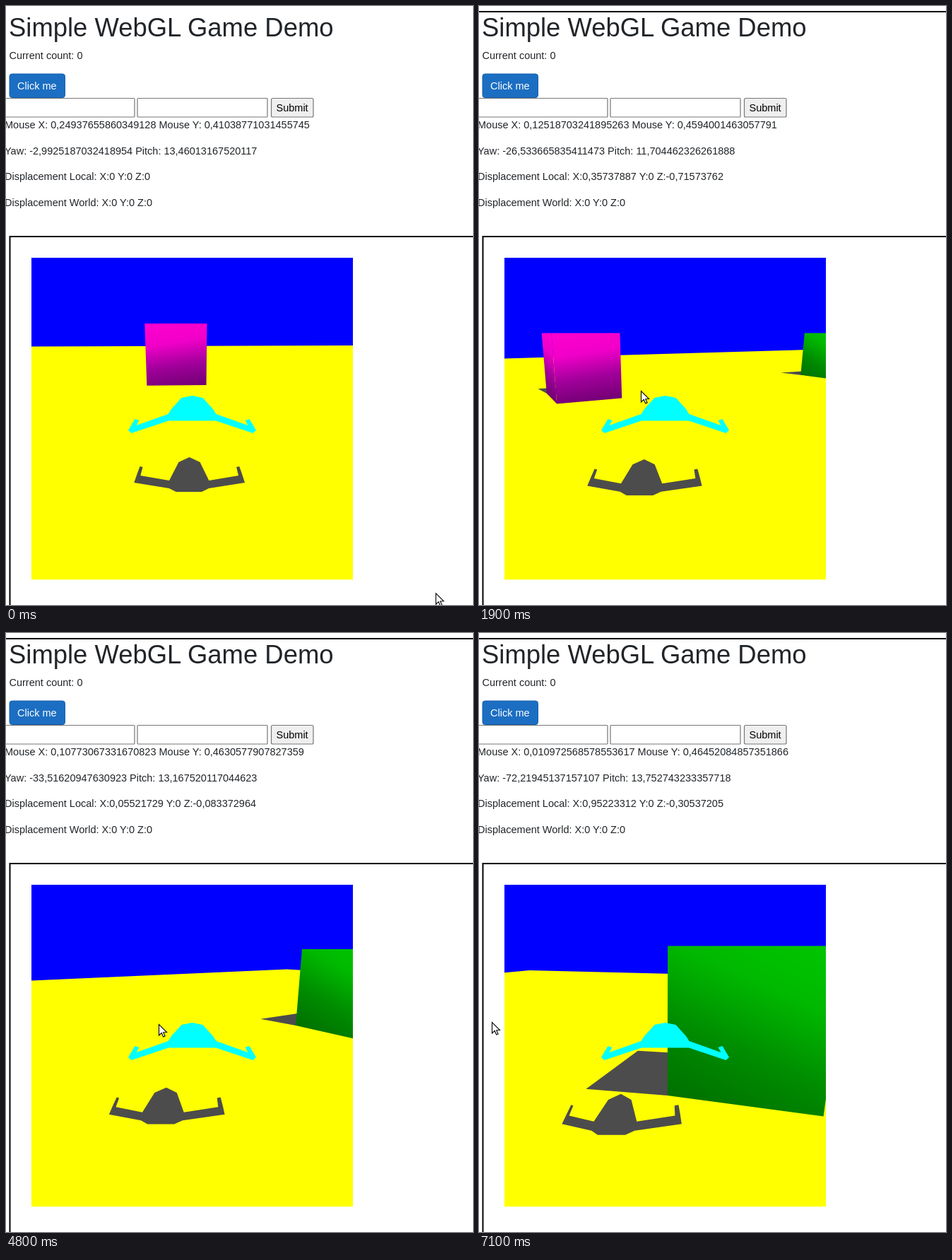
Animation of 661 by 847 pixels, one loop 7200 ms. Source, as an HTML page with a canvas:

```html
<!DOCTYPE html>
<html lang="en">
<head>
<meta charset="utf-8">
<title>Simple WebGL Game Demo</title>
<style>
  html, body { margin: 0; width: 661px; height: 847px; overflow: hidden; background: #fff; }
  svg, canvas { position: absolute; left: 0; top: 0; }
  text { font: 14.5px "Liberation Sans", Arial, sans-serif; fill: #212529; white-space: pre; }
  .title { font-size: 36.43px; }
  .field { fill: #fff; stroke: #767676; stroke-width: 1.2; }
</style>
</head>
<body>
<svg width="661" height="847">
  <path id="topLine" d="M0 8H661" stroke="#000" stroke-width="2"/>
  <path d="M661 326H5.5V847" fill="none" stroke="#000" stroke-width="2"/>
  <text class="title" x="4" y="43">Simple WebGL Game Demo</text>
  <text x="4.5" y="75">Current count: 0</text>
  <rect x="5" y="96" width="78.5" height="33.5" rx="3.5" fill="#1b6ec2" stroke="#1861ac"/>
  <text x="16" y="118" style="fill:#fff">Click me</text>
  <rect class="field" x="-4" y="130.5" width="186" height="26.5" rx="1"/>
  <rect class="field" x="186" y="130.5" width="184" height="26.5" rx="1"/>
  <rect class="field" x="375.5" y="130.5" width="59.5" height="26.5" rx="2" style="fill:#efefef"/>
  <text x="382.5" y="149" style="fill:#000">Submit</text>
  <text id="mouse" x="-2" y="173"></text>
  <text id="angles" x="-2" y="209.5"></text>
  <text id="local" x="-2" y="246"></text>
  <text x="-2" y="282.5">Displacement World: X:0 Y:0 Z:0</text>
</svg>
<canvas width="661" height="847"></canvas>
<script>
const ctx = document.querySelector('canvas').getContext('2d');
const byId = id => document.getElementById(id);
const LOOP = 7200, RAD = Math.PI / 180;
const VIEW = { x: 36, y: 356, size: 455 };
const CENTER = [VIEW.x + VIEW.size / 2, VIEW.y + VIEW.size / 2];
const FOCAL = VIEW.size / 2 / Math.tan(25 * RAD);
const EDGE = 16, NEAR = .05;

// time, camera x, camera z, camera tilt, yaw and pitch in mouse pixels, pointer x, pointer y
const KEYS = [
  [0, -.04, -.25, 15.4, -15, 46, 608, 830],
  [1200, -.06, .69, 14.2, -72, 41, 282, 544],
  [2600, -2.52, .07, 13.64, -194, 38, 176, 544],
  [3900, .18, 1.26, 13.87, -188, 40, 176, 544],
  [4800, 1.79, 3.45, 15.62, -168, 45, 216, 553],
  [5700, 1.8, 2.6, 16.3, -63, 37, 403, 562],
  [7100, 3.39, 5.84, 16.11, -362, 47, 18, 550]
];
const CUBES = [
  { x: 0, z: 6, slant: .15, colors: ['#ff00d0', '#f000c8', '#a0009a', '#700072'] },
  { x: 6, z: 6, slant: .45, colors: ['#00c800', '#00b800', '#008c00', '#007000'] }
];

// Right halves, from the top middle clockwise to the bottom
const SHIP = [[0, -35], [15, -32], [29.5, -16], [34, -9], [79, 7], [75, 0], [81, -2], [90.5, 14], [86, 18], [80, 16], [33.5, .5]];
const SHADE = [[0, -49], [15, -42], [28, -16], [69, -23], [66, -35], [70, -36], [74, -25], [78, -13], [28, -5], [18, 0]];
const mirror = half => [...half, ...half.map(([x, y]) => [-x, y]).reverse()];

const clamp = v => Math.max(0, Math.min(1, v));

function stateAt(t) {
  let i = 0;
  while (i < KEYS.length - 2 && t >= KEYS[i + 1][0]) i++;
  const a = KEYS[i], b = KEYS[i + 1], k = clamp((t - a[0]) / (b[0] - a[0]));
  const [, x, z, tilt, yaw, pitch, px, py] = a.map((v, j) => v + (b[j] - v) * k);
  const ramp = start => clamp((t - start) / 1000);
  return {
    x, z, yaw, pitch, px, py,
    tilt: tilt * RAD,
    heading: -yaw * 80 / 401 * RAD,
    bank: clamp(1 - Math.abs(t - 5700) / 900),
    speed: ramp(1100) - ramp(3900) + ramp(5800),
    regrip: clamp(1 - t / 1200)
  };
}

function project(points, cam) {
  const ch = Math.cos(cam.heading), sh = Math.sin(cam.heading);
  const ct = Math.cos(cam.tilt), st = Math.sin(cam.tilt);
  const eye = points.map(([x, y, z]) => {
    const dx = x - cam.x, dy = y - 1, dz = z - cam.z, ahead = dx * sh + dz * ch;
    return [dx * ch - dz * sh, ahead * st + dy * ct, ahead * ct - dy * st];
  });
  const kept = [];
  eye.forEach((p, i) => {
    const q = eye[(i + 1) % eye.length];
    if (p[2] >= NEAR) kept.push(p);
    if (p[2] >= NEAR !== q[2] >= NEAR) {
      const k = (NEAR - p[2]) / (q[2] - p[2]);
      kept.push(p.map((v, j) => v + (q[j] - v) * k));
    }
  });
  return kept.map(([x, y, d]) => [CENTER[0] + FOCAL * x / d, CENTER[1] - FOCAL * y / d]);
}

function poly(points, fill) {
  ctx.beginPath();
  points.forEach(p => ctx.lineTo(...p));
  ctx.closePath();
  ctx.fillStyle = fill;
  ctx.fill();
}

// Bands of equal light run from the far top corner to a point down the lit edge
function lightAcross([lit, far, farLow, litLow], { slant, colors }) {
  let nx = lit[1] + (litLow[1] - lit[1]) * slant - far[1];
  let ny = far[0] - lit[0] - (litLow[0] - lit[0]) * slant;
  if (ny < 0) [nx, ny] = [-nx, -ny];
  const k = ((farLow[0] - lit[0]) * nx + (farLow[1] - lit[1]) * ny) / (nx * nx + ny * ny);
  const g = ctx.createLinearGradient(lit[0], lit[1], lit[0] + nx * k, lit[1] + ny * k);
  colors.forEach((c, i) => g.addColorStop(i / (colors.length - 1), c));
  return g;
}

function drawCube(cube, cam) {
  const x0 = cube.x - .5, x1 = cube.x + .5, z0 = cube.z - .5, z1 = cube.z + .5;
  const face = (x, z) => {
    const p = project([[x0, 1, z0], [x, 1, z], [x, 0, z], [x0, 0, z0]], cam);
    if (p.length === 4) poly(p, lightAcross(p, cube));
  };
  const shade = [[x0, 0, z1], [x0 - .07, 0, z1 + .6], [x1 - .07, 0, z1 + .6], [x1, 0, z1]];
  poly(project(shade, cam), '#4c4c4c');
  if (cam.z < z0) face(x1, z0);
  if (cam.x < x0) face(x0, z1);
}

function drawFlyer({ heading, bank }) {
  const s = Math.sin(heading), s2 = s * s;
  const roll = (x, y, slide, bend) => [x + bank * (slide - .9 * y + bend * x * x), y + .09 * bank * x];
  const shade = mirror(SHADE).map(([x, y]) => {
    const [rx, ry] = roll(x * (1 + .09 * s) - .3 * s * y + .002 * s * x * x, y * (1 + .2 * s2), 8, .003);
    return [263 - 80 * s + rx, 687 + 25 * s2 + ry];
  });
  const ship = mirror(SHIP).map(([x, y]) => {
    const [rx, ry] = roll(x, y, -8, .0052);
    return [CENTER[0] + rx, 586 + ry];
  });
  poly(shade, '#4c4c4c');
  poly(ship, '#0ff');
}

function drawScene(state) {
  ctx.save();
  ctx.beginPath();
  ctx.rect(VIEW.x, VIEW.y, VIEW.size, VIEW.size);
  ctx.clip();
  ctx.fillStyle = '#00f';
  ctx.fillRect(VIEW.x, VIEW.y, VIEW.size, VIEW.size);
  const ground = [[-EDGE, 0, -EDGE], [-EDGE, 0, EDGE], [EDGE, 0, EDGE], [EDGE, 0, -EDGE]];
  poly(project(ground, state), '#ff0');
  CUBES.forEach(cube => drawCube(cube, state));
  drawFlyer(state);
  ctx.restore();
}

function drawPointer({ px, py }) {
  const arrow = [[0, 0], [0, 15.5], [3.7, 12], [6.2, 17.5], [8.6, 16.5], [6.2, 11.2], [11, 11]];
  poly(arrow.map(([x, y]) => [px + x + .5, py + y + .5]), '#fff');
  ctx.strokeStyle = '#000';
  ctx.lineWidth = 1.1;
  ctx.stroke();
}

const comma = v => String(v).replace('.', ',');

// Shortest decimal that survives single precision
function single(v) {
  let digits = 6;
  while (Math.fround(v.toPrecision(digits)) !== Math.fround(v)) digits++;
  return comma(+v.toPrecision(digits));
}

function writeReadings({ yaw, pitch, regrip, heading, speed }) {
  const dx = Math.round(yaw), dy = Math.round(pitch);
  const x = dx + Math.round(384 + 131 * regrip), y = dy + Math.round(588 - 73 * regrip);
  byId('mouse').textContent = `Mouse X: ${comma(x / 2005)} Mouse Y: ${comma(y / 1367)}`;
  byId('angles').textContent = `Yaw: ${comma(dx * 80 / 401)} Pitch: ${comma(dy * 400 / 1367)}`;
  byId('local').textContent =
    `Displacement Local: X:${single(speed * Math.sin(heading))} Y:0 Z:${single(-speed * Math.cos(heading))}`;
}

function frame(now) {
  let t = Math.floor(now % LOOP / 100) * 100;
  if (t > 3100 && t < 3500) t = 3100;
  const state = stateAt(t);
  ctx.clearRect(0, 0, 661, 847);
  byId('topLine').style.visibility = t < 900 ? 'hidden' : 'visible';
  writeReadings(state);
  drawScene(state);
  drawPointer(state);
  requestAnimationFrame(frame);
}
frame(0);
</script>
</body>
</html>
```
